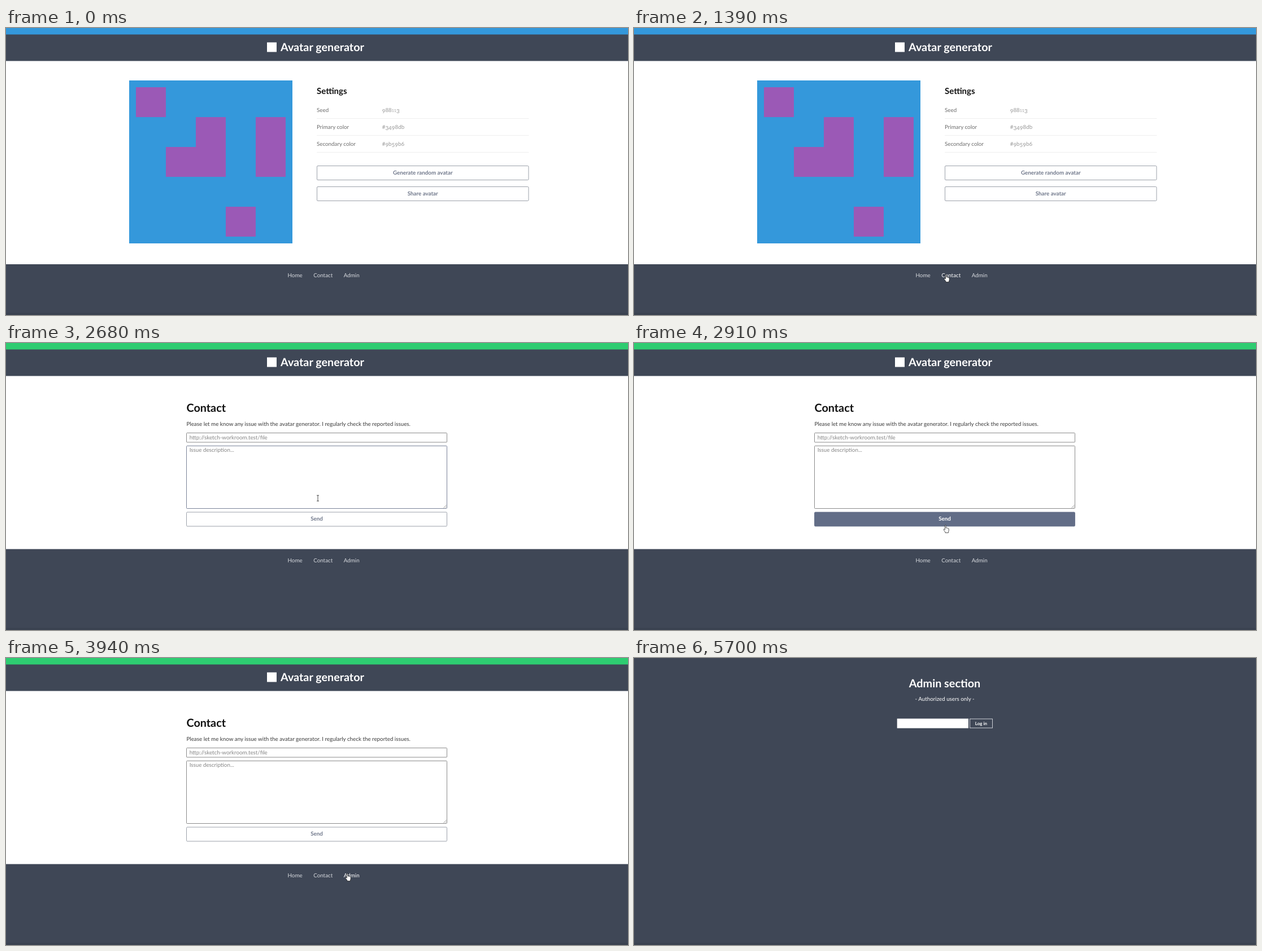
Recreate the animation shown at these times as an HTML page. Size 1101 px wide and 509 px high, loop 6.19 s.

```html
<!DOCTYPE html>
<html lang="en">
<head>
<meta charset="utf-8">
<title>Avatar generator</title>
<style>
html, body { margin: 0; width: 100%; height: 100%; overflow: hidden; background: #fff; }
svg { display: block; width: 100%; height: 100%; }
text { font-family: Lato, "Open Sans", sans-serif; text-rendering: geometricPrecision; white-space: pre; }
.b { font-weight: 700; }
.mid { text-anchor: middle; }
</style>
</head>
<body>
<svg id="stage" viewBox="0 0 1101 509"></svg>
<script>
const LOOP = 6190, CONTACT_AT = 2220, ADMIN_AT = 4270, RELEASE_AT = 4930;
const W = 1101, H = 509, BODY = 9.8, TITLE = 19.8;
const DARK = '#3f4756', BLUE = '#3498db', GREEN = '#2ecc71', PURPLE = '#9b59b6';
const SLATE = '#626d87', BORDER = '#8b909b', FIELD = '#767676', LINK = '#d6d9de';
const stage = document.getElementById('stage');

function add(parent, tag, attrs, content) {
  const el = document.createElementNS('http://www.w3.org/2000/svg', tag);
  for (const key in attrs) el.setAttribute(key, attrs[key]);
  if (content) el.textContent = content;
  return parent.appendChild(el);
}
const group = parent => add(parent, 'g', {});
const box = (parent, x, y, width, height, fill, more) =>
  add(parent, 'rect', { x, y, width, height, fill, ...more });
const label = (parent, x, y, size, fill, str, cls = '') =>
  add(parent, 'text', { x, y, 'font-size': size, fill, class: cls }, str);
const frame = (parent, x, y, w, h, stroke, rx = 1.5) =>
  box(parent, x, y, w, h, 'none', { stroke, rx, 'stroke-width': .85 });

// Old-style figures: some hang below the baseline, some are x-height
function figures(parent, x, y, str) {
  const line = label(parent, x, y, BODY, '#999');
  let drop = 0;
  for (const ch of str) {
    const want = '34579'.includes(ch) ? 1.7 : 0;
    const size = '012'.includes(ch) ? 7 : BODY;
    add(line, 'tspan', { dy: want - drop, 'font-size': size }, ch);
    drop = want;
  }
}

function button(parent, x, y, w, str) {
  const h = 25;
  const rect = frame(parent, x, y, w, h, BORDER);
  const text = label(parent, x + w / 2, y + h / 2 + 2.9, BODY, '#70788b', str, 'b mid');
  return on => {
    rect.setAttribute('fill', on ? SLATE : 'none');
    rect.setAttribute('stroke', on ? SLATE : BORDER);
    text.setAttribute('fill', on ? '#fff' : '#70788b');
  };
}

// Page shell
const shell = group(stage);
box(shell, 0, 0, W, H, '#fff');
box(shell, 0, 11, W, 47.5, DARK);
const strip = box(shell, 0, 0, W, 11.5, BLUE);
box(shell, 462, 25.5, 17, 17, '#fff');
label(shell, 486, 41, TITLE, '#fff', 'Avatar generator', 'b');
const footer = group(shell);
box(footer, 0, 0, W, H, DARK);
let linkX = 498.5;
const links = ['Home', 'Contact', 'Admin'].map(str => {
  const el = label(footer, linkX, 23, BODY, LINK, str);
  const link = { el, x: linkX, w: el.getComputedTextLength() };
  linkX += link.w + 19.6;
  return link;
});

// Home
const home = group(stage);
const CELL = 53.15;
box(home, 218, 93, 289, 289, BLUE);
['#....', '..#.#', '.##.#', '.....', '...#.'].forEach((row, r) =>
  [...row].forEach((mark, c) => mark === '#' &&
    box(home, 229.7 + c * CELL, 104.5 + r * CELL, CELL, CELL, PURPLE, { 'shape-rendering': 'crispEdges' })));
label(home, 550, 117.3, 15, '#111', 'Settings', 'b');
[['Seed', '988113'], ['Primary color', BLUE], ['Secondary color', PURPLE]].forEach(([name, value], i) => {
  const y = 149.2 + i * 29.8;
  label(home, 550, y, BODY, '#6c6c6c', name);
  figures(home, 665.7, y, value);
  box(home, 550, Math.round(y + 11), 375.5, 1, '#efefef');
});
['Generate random avatar', 'Share avatar'].forEach((str, i) =>
  button(home, 550.5, 244.5 + i * 37, 374.5, str));

// Contact
const contact = group(stage);
label(contact, 319.5, 122, TITLE, '#111', 'Contact', 'b');
label(contact, 319.5, 146.7, BODY, '#3a3a3a',
  'Please let me know any issue with the avatar generator. I regularly check the reported issues.');
frame(contact, 319.5, 159.5, 461, 16.5, FIELD, 1);
label(contact, 324.7, 170.6, BODY, '#858585', 'http://sketch-workroom.test/file');
const area = frame(contact, 319.5, 182.5, 461, 111, FIELD, 1);
label(contact, 324.7, 193.2, BODY, '#858585', 'Issue description...');
add(contact, 'path', { d: 'M774.5 292.5l5-5M777.5 292.5l2-2', stroke: '#777', 'stroke-width': .7 });
const lightSend = button(contact, 319.5, 300, 461, 'Send');

// Admin
const admin = group(stage);
box(admin, 0, 0, W, H, DARK);
label(admin, 550, 52, TITLE, '#fff', 'Admin section', 'b mid');
label(admin, 550, 76.3, BODY, '#fff', '- Authorized users only -', 'mid');
box(admin, 465.7, 107.5, 126.3, 17, '#fff');
frame(admin, 594.5, 108, 40, 16, '#e6e8ec', 0);
label(admin, 614.4, 118.8, 8, '#fff', 'Log in', 'b mid');

box(stage, 0, 505, W, 4, '#3a4250');

// Pointer shapes, each with its hot spot at 0,0
const pointer = group(stage);
const ink = { fill: '#fff', stroke: '#111', 'stroke-width': .7, 'stroke-linejoin': 'round' };
const shapes = {
  arrow: add(pointer, 'path', { d: 'M0 0V9.6L2.2 7.6L3.7 11.2L5.3 10.5L3.8 7H6.6Z', ...ink }),
  hand: add(pointer, 'path', {
    d: 'M-.6 .9Q-.5 .1.3 .1Q1.2 .1 1.2 1V5Q2.4 4.3 2.9 5.3Q4 4.7 4.6 5.8Q6.2 5.4 6.2 7.2V9.2' +
       'Q6.2 11 5.4 12V13.6H-.1V12.2L-3 8.3Q-3.3 7.3-2.3 7Q-1.4 7-.6 8.2Z', ...ink }),
  beam: add(pointer, 'path', { d: 'M-2-5H2M0-5V5M-2 5H2', fill: 'none', stroke: '#222', 'stroke-width': .8 })
};

// Pointer stops; each move eases out from the stop before it
const SHOWN_AT = 80, HIDDEN_AT = 5700, STEP = 78;
const moves = [
  { from: 80, to: 630, x: 482, y: 393 },
  { from: 630, to: 1390, x: 552, y: 437 },
  { from: 2160, to: 2220, x: 552.5, y: 424 },
  { from: 2220, to: 2770, x: 552, y: 262 },
  { from: 2770, to: 2910, x: 551, y: 323 },
  { from: 2910, to: 3160, x: 568, y: 355 },
  { from: 3310, to: 3870, x: 604, y: 382 },
  { from: 5240, to: 5400, x: 570, y: 345 },
  { from: 5560, to: 5700, x: 665, y: 480 }
];

function pointerAt(t) {
  if (t < SHOWN_AT || t >= HIDDEN_AT) return null;
  let x = 392, y = 104;
  for (const move of moves) {
    if (t < move.from) break;
    const span = move.to - move.from, steps = Math.round(span / STEP);
    const p = Math.min(1, Math.floor((t - move.from) / span * steps) / steps);
    const eased = p * (2 - p);
    x += (move.x - x) * eased;
    y += (move.y - y) * eased;
  }
  return { x, y };
}

const show = (el, on) => el.setAttribute('display', on ? 'inline' : 'none');
const inside = (p, x, y, w, h) => !!p && p.x >= x && p.x <= x + w && p.y >= y && p.y <= y + h;

function render(t) {
  const onAdmin = t >= ADMIN_AT, onContact = t >= CONTACT_AT && !onAdmin;
  const top = onContact ? 365.5 : 419;
  const p = pointerAt(t);
  show(shell, !onAdmin);
  show(home, t < CONTACT_AT);
  show(contact, onContact);
  show(admin, onAdmin);
  strip.setAttribute('fill', onContact ? GREEN : BLUE);
  footer.setAttribute('transform', `translate(0 ${top})`);

  let shape = 'arrow';
  for (const { x, w, el } of links) {
    const over = !onAdmin && inside(p, x, top + 13, w, 14);
    el.setAttribute('fill', over ? '#fff' : LINK);
    if (over) shape = 'hand';
  }
  const overSend = onContact && inside(p, 319, 300, 462, 25);
  const overArea = onContact && inside(p, 319, 182, 462, 112);
  lightSend(overSend);
  area.setAttribute('stroke', overArea ? SLATE : FIELD);
  if (overSend || onAdmin && t < RELEASE_AT) shape = 'hand';
  if (overArea) shape = 'beam';

  show(pointer, p);
  if (p) pointer.setAttribute('transform', `translate(${p.x} ${p.y})`);
  for (const name in shapes) show(shapes[name], name === shape);
}

const start = performance.now();
function tick() {
  render((performance.now() - start) % LOOP);
  requestAnimationFrame(tick);
}
tick();
</script>
</body>
</html>
```
